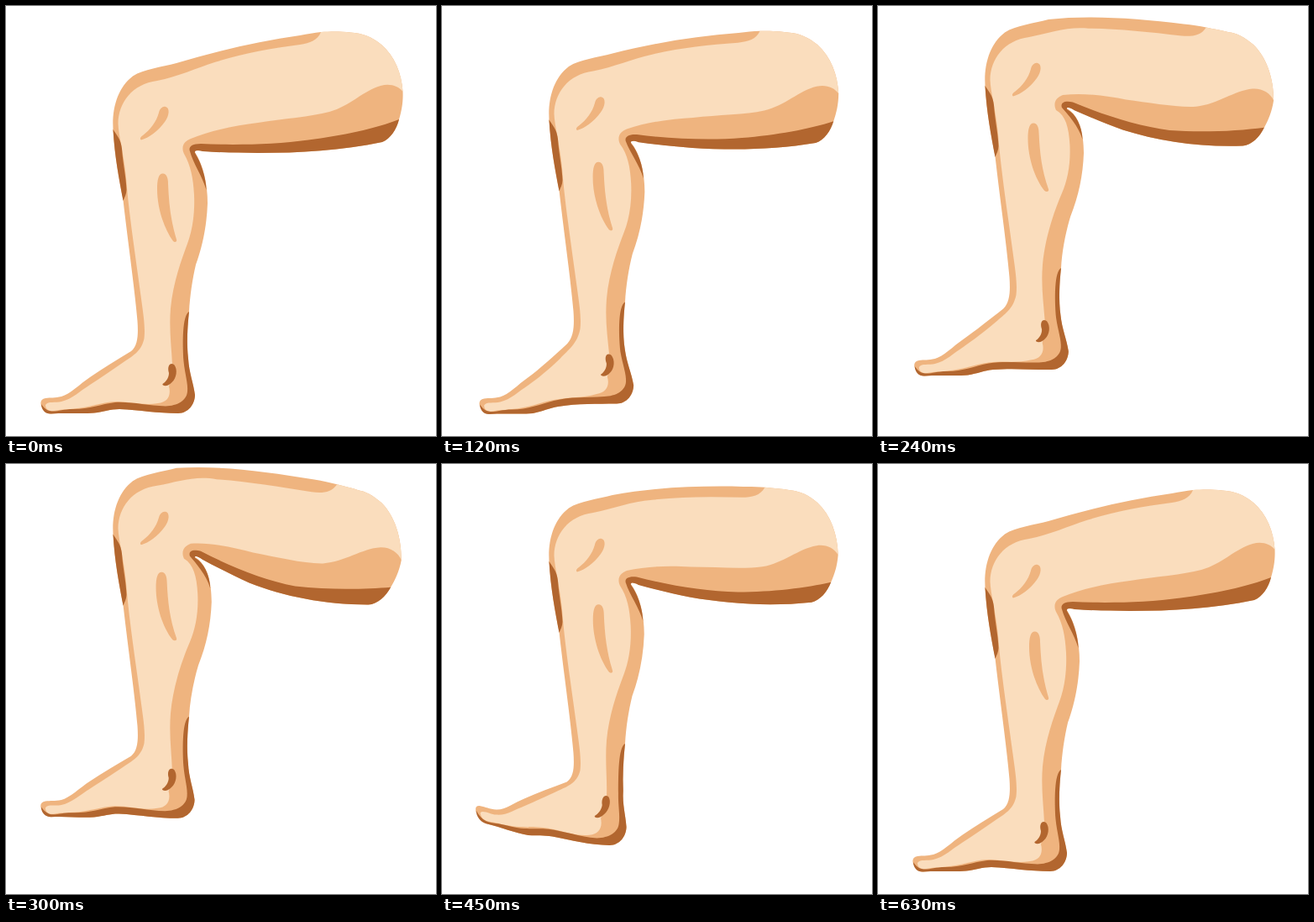
An HTML page for the animation above (1.26 s loop, 512x512 px).

```html
<!DOCTYPE html>
<html lang="en">
<head>
<meta charset="utf-8">
<title>Leg</title>
<style>
  html, body { margin: 0; width: 100%; height: 100%; overflow: hidden; background: #fff; }
  svg { display: block; width: 100%; height: 100%; }
</style>
</head>
<body>
<svg id="stage" viewBox="0 0 512 512"></svg>
<script>
const LOOP = 1260, TICK = 30, REST = 630;
const SKIN = '#efb47f', LIGHT = '#faddbd', SHADE = '#b2662f';

// Leg at rest; every coordinate pair is moved by warpThigh() or warpShin().
const SHAPES = [
  // thigh
  [SKIN, `M128,152 C125,125 132,98 151,83.5 C164,75 185,73 203,68 C250,54 300,42 350,35
    C359,33 367,32 375,31 C385,30.5 398,30 410,31.5 C424,32 436,37 447,46
    C463,60 471,80 472.5,102 C473,115 471,125 468,135 C465,147 458,158 448,162
    C400,172 350,175 300,175 C275,175 250,174 226,172 L200,190 Z`],
  // shin and foot
  [SKIN, `M127.5,147 C129.5,180 134.5,205 139.5,231 C145,280 153,335 156.5,375 C157.5,390 157.5,404 149,411
    C132,421 115,432 100,442 C88,450 76,462.5 66,465 C58,467 53,466 47,467 C41,468 40,473 43,478
    C45,483 48,485.5 54,485.5 C72,484 88,486 105,484.5 C117,483 124,480 135,480
    C160,481 180,485 205,485 C217,485 225,474 225,463 C223,448 218,437 217,420
    C215,402 216,382 218,364 C219,345 222,325 226,308 C234,286 239,262 240,235
    C240,212 235,190 225,174 L215,150 L150,130 Z`],
  // lit skin
  [LIGHT, `M375,31 C371,41 362,44 350,46 C315,50.5 282,56.5 250,66.5 C225,74.5 205,84 180,89
    C150,93 134,115 133.5,140 C134,155 141,180 143,205 C146,245 154.5,300 160.5,345
    C164,370 166,383 164.5,396 C161,412 150,417 140,424 C125,434.5 112,443 100,451
    C88,458.5 79,468 66,471 C59,473 50,470 47,475 C47,480 51,483 57,482 C66,480 70,481 80,479.5
    C100,478 113,472 130,471 C150,471 163,476 181,473 C192,472 197,464 194,453
    L196,445 L198,427 C197,405 194,385 196,360 C199,329 209,302 216,283
    C222,267 225,247 224,225 C223,205 220,190 212,176 C208,167 212,161 220,158
    C245,148 275,142 300,139 C330,134 363,132 385,126 C410,119 425,101 446,95
    C457,92 467,95 472.5,102 C471,80 463,60 447,46 C436,37 424,32 410,31.5 C398,30 385,30.5 375,31 Z`],
  // underside of thigh and back of knee
  [SHADE, `M468,135 C440,146 400,154.5 360,159.5 C320,165 270,166 232,164 C221,164 217,168 219,173
    C222.5,187 234,203 238.5,219 C238,203 232,186 225,175 C224,172 228,171 234,173
    C255,174.5 278,175 300,175 C350,175 400,172 448,162 C458,158 465,147 468,135 Z`],
  // front of knee
  [SHADE, `M127.5,147 C132,154 137,159 138,170 C139,187 143,203 143.5,219
    C143.5,224 141,228 139.5,232 C134.5,205 129.5,180 127.5,147 Z`],
  // heel and sole
  [SHADE, `M218,364 C210,368 210,400 211.5,423 C213,438 217,450 216,459 C215,470 204,476 190,476.5
    C168,476 150,471 130,472 C113,474 100,480 80,480 C68,480 62,483 54,482.5
    C48,482 44,477 42,474 C42,481 47,486 54,485.5 C72,484 88,486 105,484.5
    C117,483 124,480 135,480 C160,481 180,485 205,485 C217,485 225,474 225,463
    C223,448 218,437 217,420 C215,402 216,382 218,364 Z`],
  // kneecap, calf and ankle marks
  [SKIN, `M190,120 C195,121 195,130 189,138 C181,149 170,157 161,159.5 C159,158 160,156 163,154
    C172,147 179,138 182,127 C183,122 187,119 190,120 Z`],
  [SKIN, `M187,199.5 C182,199 180,206 180,218 C180,240 188,265 199,280 C201,282 204,281 203,278
    C196,255 194,235 193,212 C193,204 191,200 187,199.5 Z`],
  [SHADE, `M197.5,426 C193,426 192.5,432 194,437 C194,443 190,448 186.5,450 C185.5,452 190,453 193,451.5
    C200,448 204,440 202.5,432 C201.5,428 200,426 197.5,426 Z`]
];

// time, vertical shift of the leg, shift of the toes, calf flex
const KEYS = [
  [0, 0, 0, 0], [60, -2, 2, .05], [120, -11.5, 12, .27], [180, -30, 15, .7], [240, -52, 7, 1],
  [305, -63.5, -3, .95], [360, -59, -13, .8], [410, -47, -23, .4], [450, -31, -26, .15],
  [510, 5.5, 0, 0], [550, 5.5, 0, 0], [590, 2.5, 0, 0], [630, 0, 0, 0]
];

const clamp = (v, lo, hi) => Math.min(hi, Math.max(lo, v));
const ramp = (v, a, b) => {
  const u = clamp((v - a) / (b - a), 0, 1);
  return u * u * (3 - 2 * u);
};

function slope(i, c) {
  const a = KEYS[i - 1], b = KEYS[i + 1];
  return a && b ? (b[c] - a[c]) / (b[0] - a[0]) : 0;
}

function track(t, c) {
  let i = 0;
  while (i < KEYS.length - 2 && t > KEYS[i + 1][0]) i++;
  const a = KEYS[i], b = KEYS[i + 1], span = b[0] - a[0], u = (t - a[0]) / span;
  const s = u * u * (3 - 2 * u);
  return a[c] + (b[c] - a[c]) * s
    + span * u * (1 - u) * ((1 - u) * slope(i, c) - u * slope(i + 1, c));
}

// The thigh turns about the hip while its knee end follows the shin.
function warpThigh(x, y, lift) {
  const u = Math.min(1, (430 - x) / 205);
  const follow = u > 0 ? u ** 1.4 : 0;
  if (lift > 0) return [x, y + lift * follow];
  const k = -lift / 59;
  const tilt = u < 0 ? u * ramp(y, 40, 110) : 0;
  if (y > 95) return [x - .23 * k * ramp(x, 225, 370) * (y - 95), y + lift * (follow + tilt)];
  // along the top the hip outline stays, and the inner edge lags behind
  const fade = 1 - ramp(x, 375, 445);
  const lag = 4 * ramp(y + x * .2, 105, 114) * ramp(x, 200, 250) + 3 * ramp(x, 340, 380);
  return [
    x - .28 * k * ramp(x, 225, 370) * fade * (y - 95),
    y + lift * (follow + tilt) + k * fade * Math.min(lag, 4)
  ];
}

function warpShin(x, y, lift, tip, flex) {
  const foot = ramp(y, 395, 430);
  const reach = tip > 0 ? ramp(190 - x, 0, 85) : clamp((190 - x) / 135, 0, 1.15) ** 1.75;
  const pull = ramp(y, 400, 465) * (tip > 0 ? .26 : .05 + .16 * ramp(x, 60, 200));
  const calf = flex * ramp(y, 175, 192) * (1 - ramp(y, 285, 345));
  const inner = ramp(x, 150, 180);
  // when pressed down, the sole stays on the ground
  const press = lift > 0 ? (1 - ramp(y, 460, 485)) * (1 - foot * (1 - ramp(x, 60, 150))) : 1;
  return [
    x + tip * pull + calf * (6.5 * ramp(x, 190, 232) - 1.5 * inner),
    y + lift * press + tip * foot * reach - 8 * calf * inner
  ];
}

const stage = document.getElementById('stage');
const paths = SHAPES.map(([fill]) => {
  const p = document.createElementNS('http://www.w3.org/2000/svg', 'path');
  p.setAttribute('fill', fill);
  return stage.appendChild(p);
});

function draw(ms) {
  const t = Math.min(REST, Math.floor((ms % LOOP) / TICK) * TICK);
  const lift = track(t, 1), tip = track(t, 2), flex = track(t, 3);
  const move = (_, x, y) => {
    x = +x; y = +y;
    const p = y < 180 ? warpThigh(x, y, lift) : warpShin(x, y, lift, tip, flex);
    return p.map(v => v.toFixed(2)).join();
  };
  SHAPES.forEach(([, d], i) => paths[i].setAttribute('d', d.replace(/([\d.]+),([\d.]+)/g, move)));
}

const start = performance.now();
function loop() {
  draw(performance.now() - start);
  requestAnimationFrame(loop);
}
loop();
</script>
</body>
</html>
```
